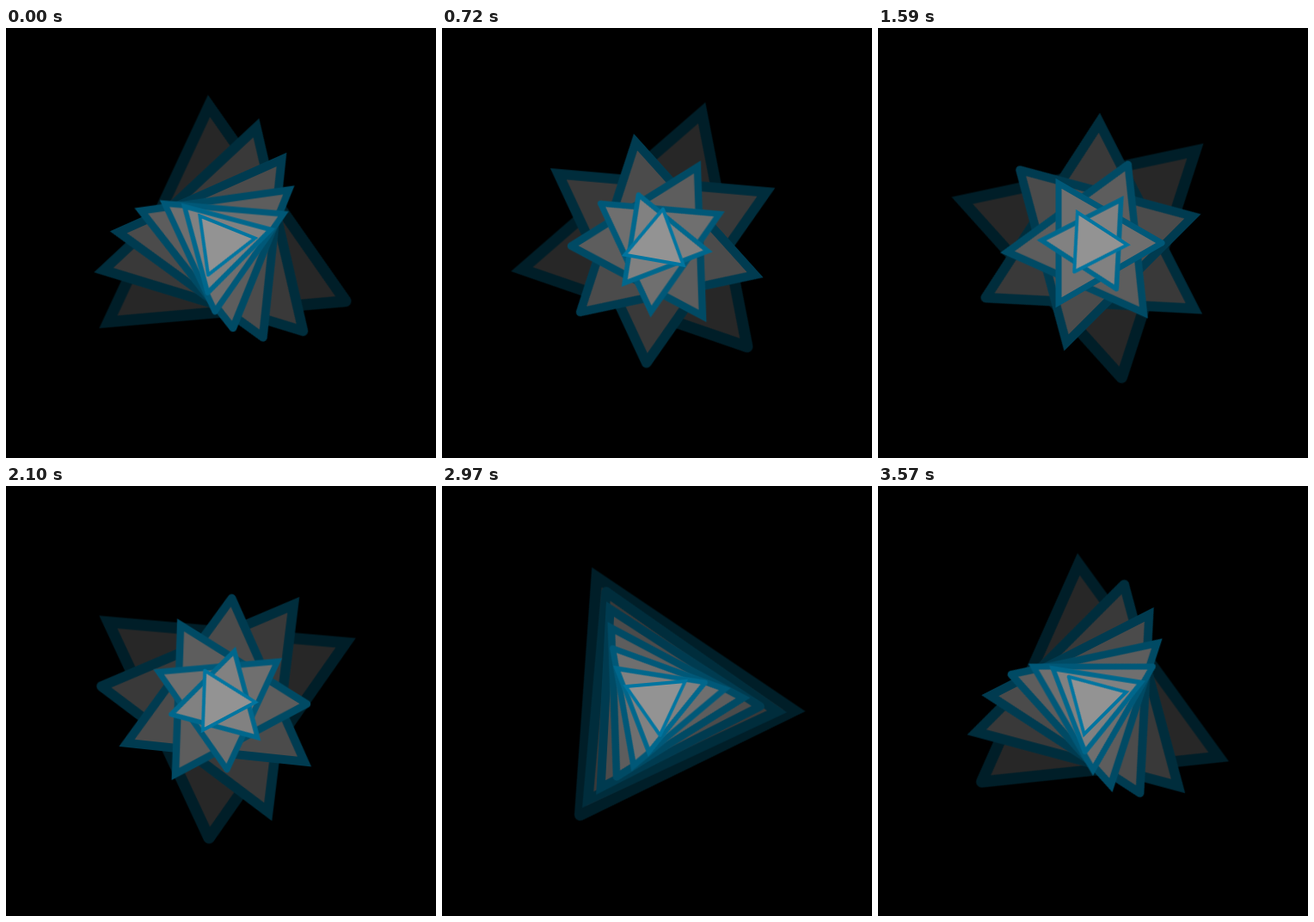
Write an HTML page that moves like this. It is 500 px wide and 500 px high and loops after 3600 ms.

```html
<!DOCTYPE html>
<html lang="en">
<head>
<meta charset="utf-8">
<title>Spinning triangles</title>
<style>
  html, body { margin: 0; width: 100%; height: 100%; overflow: hidden; background: #000; }
  svg { display: block; width: 500px; height: 500px; }
  polyline {
    stroke-linecap: round;
    stroke-linejoin: miter;
    transform-origin: 0 0;
    /* 30 ms ticks; the tiny delay keeps each tick clear of its boundary */
    animation: spin 3600ms steps(120) -2ms infinite;
  }
  @keyframes spin {
    from { transform: rotate(var(--from)); }
    to { transform: rotate(var(--to)); }
  }
</style>
</head>
<body>
<svg viewBox="0 0 500 500"><g id="stack" transform="translate(250 250)"></g></svg>
<script>
  const COUNT = 7;
  const stack = document.getElementById('stack');

  // Open path whose ends meet at angle 0, so that one corner is rounded.
  const triangle = r => [0, 120, 240, 0].map(deg => {
    const a = deg * Math.PI / 180;
    return `${r * Math.cos(a)},${r * Math.sin(a)}`;
  }).join(' ');

  // Outermost first; each triangle turns i degrees per tick.
  for (let i = 1; i <= COUNT; i++) {
    const depth = i - 1;
    const grey = 39 + 18 * depth;
    const start = i * (53 - 3 * i) / 2;
    const line = document.createElementNS('http://www.w3.org/2000/svg', 'polyline');
    line.setAttribute('points', triangle(160 - 20 * depth));
    line.setAttribute('fill', `rgb(${grey},${grey},${grey})`);
    line.setAttribute('stroke', `rgb(0,${30 + 14.5 * depth},${40 + 20 * depth})`);
    line.setAttribute('stroke-width', 13 - 1.5 * depth);
    line.style.setProperty('--from', `${start}deg`);
    line.style.setProperty('--to', `${start + 120 * i}deg`);
    stack.append(line);
  }
</script>
</body>
</html>
```
